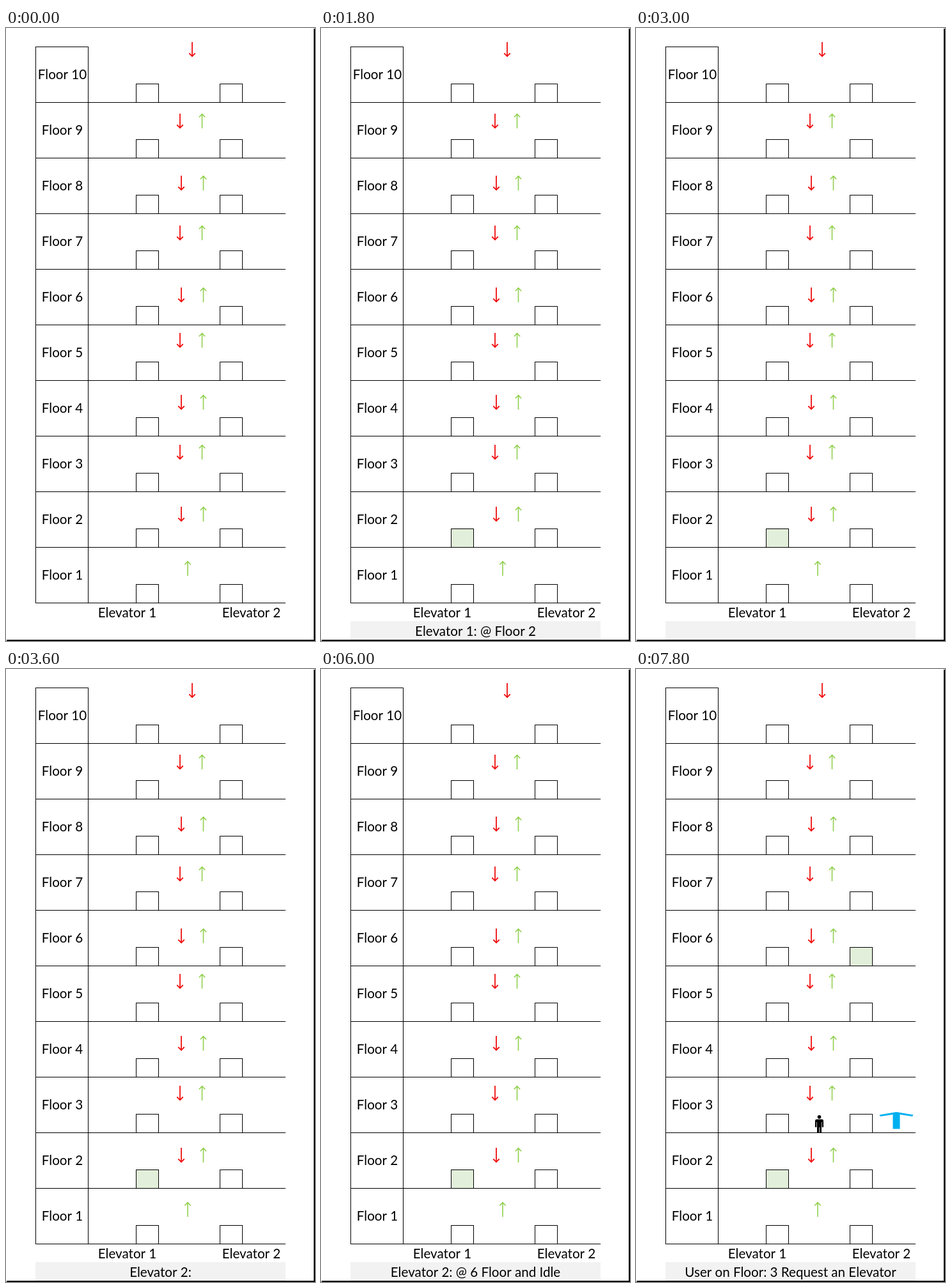
Recreate the animation shown at these times as an HTML page with a canvas. Size 483 px wide and 959 px high, loop 8 s.

```html
<!DOCTYPE html>
<html lang="en">
<head>
<meta charset="utf-8">
<title>Elevators</title>
<style>
html, body { margin: 0; width: 100%; height: 100%; overflow: hidden; background: #fff; }
canvas { display: block; }
</style>
</head>
<body>
<canvas id="stage" width="483" height="959"></canvas>
<script>
const ctx = document.getElementById('stage').getContext('2d');
const LOOP = 8000, STEP = 600, PITCH = 87;
const RED = '#f01010', GREEN = '#92d050', BLUE = '#00b0f0', CAR = '#e2efda';
const SHAFTS = [203, 334];

// One entry per step; text null means the caption bar is hidden.
const steps = [
  { text: null },
  { text: 'Elevator 1:' },
  { text: 'Elevator 1: @ Floor 2' },
  { text: 'Elevator 1: @ Floor 2', first: true },
  { text: 'Elevator 1: @ Floor 2 and Idle', first: true },
  { text: '', first: true },
  { text: 'Elevator 2:', first: true },
  { text: 'Elevator 2: @ 6 Floor', first: true },
  { text: 'Elevator 2: @ 6 Floor', first: true, second: true },
  { text: 'Elevator 2: @ 6 Floor and Idle', first: true, second: true },
  { text: 'Elevator 2: @ 6 Floor and Idle', first: true },
  { text: '', first: true, second: true },
  { text: 'User on Floor: 3', first: true, second: true, user: true },
  { text: 'User on Floor: 3 Request an Elevator', first: true, second: true, user: true, request: true }
];

const floorY = floor => 899 - (floor - 1) * PITCH;

function rect(x, y, w, h, color = '#000') {
  ctx.fillStyle = color;
  ctx.fillRect(x, y, w, h);
}

function label(text, x, baseline) {
  ctx.fillStyle = '#000';
  ctx.fillText(text, x, baseline);
}

function door(x, floor, fill = '#fff') {
  const y = floorY(floor);
  rect(x, y - 29, 36, 30);
  rect(x + 1, y - 28, 34, 28, fill);
}

function arrow(x, y, dir, color) {
  const tip = y + dir * 11.5;
  ctx.strokeStyle = color;
  ctx.lineWidth = color === RED ? 1.8 : 1.6;
  ctx.beginPath();
  ctx.moveTo(x, y - dir * 11.5);
  ctx.lineTo(x, tip);
  ctx.moveTo(x - 4.7, tip - dir * 5.5);
  ctx.lineTo(x, tip - dir * 0.7);
  ctx.lineTo(x + 4.7, tip - dir * 5.5);
  ctx.stroke();
}

function callArrows() {
  arrow(291, 33.5, 1, RED);
  [145.5, 242.5, 320.5, 417.5].forEach((y, i) => {
    const shift = i % 2 * 2;
    for (const top of [y, y + 343]) {
      arrow(272 + shift, top, 1, RED);
      arrow(306.5 + shift, top, -1, GREEN);
    }
  });
  arrow(284, 845.5, -1, GREEN);
}

function person(x, ground) {
  ctx.fillStyle = '#000';
  ctx.beginPath();
  ctx.arc(x, ground - 24.3, 2.8, 0, Math.PI * 2);
  ctx.fill();
  ctx.beginPath();
  ctx.roundRect(x - 6.5, ground - 20.5, 13, 4.5, 2.2);
  ctx.roundRect(x - 6.5, ground - 19, 2.3, 11, 1.1);
  ctx.roundRect(x + 4.2, ground - 19, 2.3, 11, 1.1);
  ctx.rect(x - 3.5, ground - 18, 7, 10);
  ctx.rect(x - 3.5, ground - 9, 3.1, 9);
  ctx.rect(x + 0.4, ground - 9, 3.1, 9);
  ctx.fill();
}

function requestArrow(x, y) {
  const half = [[26.5, 4.5], [25, 7], [5.5, 4], [5.5, 26.5]];
  ctx.fillStyle = BLUE;
  ctx.beginPath();
  ctx.moveTo(x, y);
  for (const [dx, dy] of half) ctx.lineTo(x + dx, y + dy);
  for (const [dx, dy] of half.slice().reverse()) ctx.lineTo(x - dx, y + dy);
  ctx.fill();
}

function building() {
  rect(46, 29, 83, 1);
  rect(46, 29, 1, 871);
  rect(128, 29, 1, 871);
  for (let floor = 1; floor <= 10; floor++) {
    const y = floorY(floor);
    rect(46, y, 391, 1);
    label('Floor ' + floor, 88, y - 36);
    for (const x of SHAFTS) door(x, floor);
  }
  label('Elevator 1', 189.5, 922);
  label('Elevator 2', 383.5, 922);
}

function draw(time) {
  const step = steps[Math.floor(time % LOOP / STEP)];
  rect(0, 0, 483, 959, '#fff');
  ctx.font = '20.6px Lato, Carlito, sans-serif';
  ctx.textAlign = 'center';
  building();
  callArrows();
  if (step.first) door(SHAFTS[0], 2, CAR);
  if (step.second) door(SHAFTS[1], 6, CAR);
  if (step.user) person(286.5, floorY(3));
  if (step.request) requestArrow(407, 693);
  if (step.text !== null) {
    rect(46, 928, 391, 29, '#f2f2f2');
    label(step.text, 241.5, 951);
  }
  rect(481, 1, 2, 958);
  rect(1, 957, 482, 2);
}

const start = performance.now();
function tick() {
  draw(performance.now() - start);
  requestAnimationFrame(tick);
}
tick();
</script>
</body>
</html>
```
